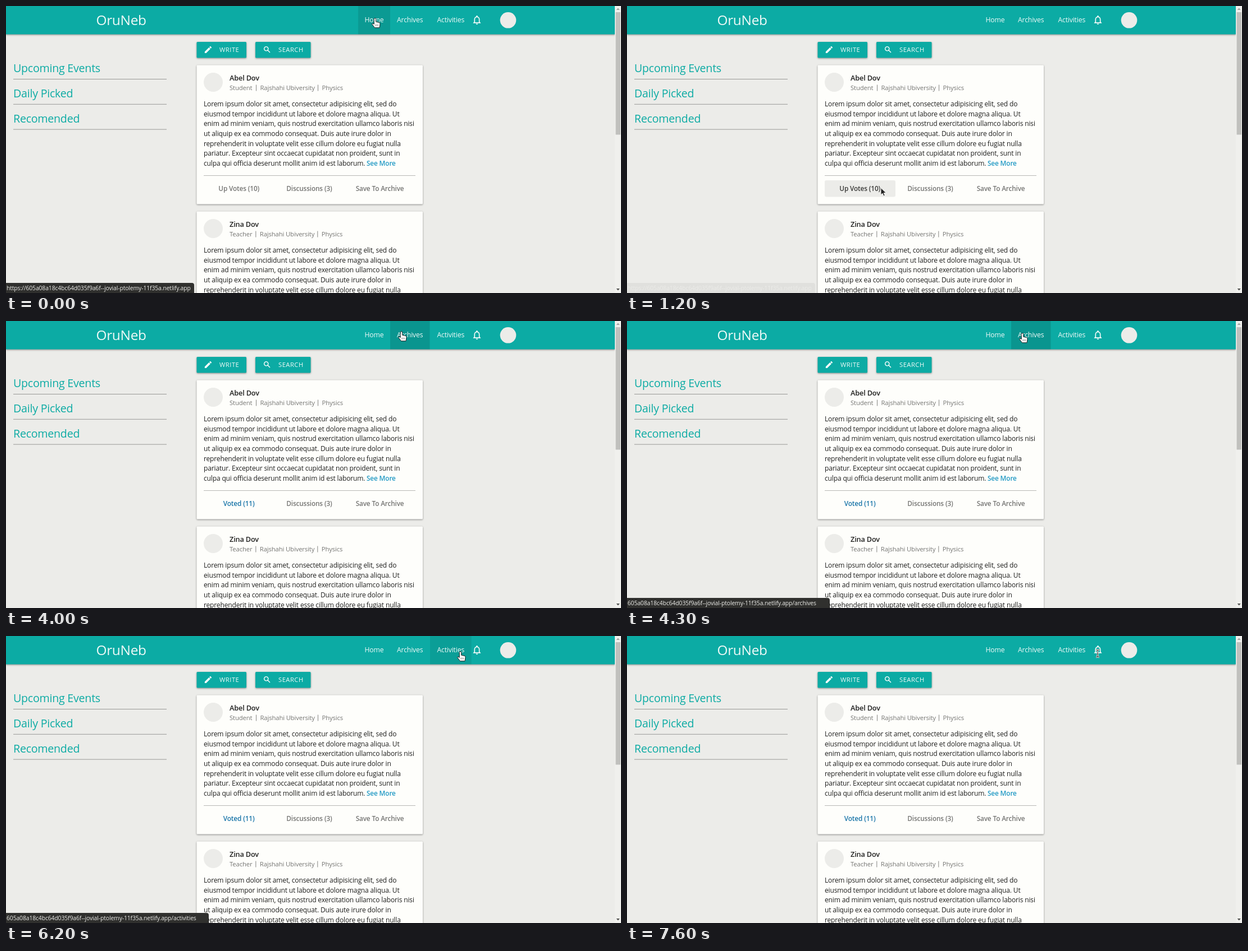
An HTML page for the animation above (8000 ms loop, 1095 px wide and 512 px high).

```html
<!DOCTYPE html>
<html lang="en">
<head>
<meta charset="utf-8">
<title>Study feed</title>
<style>
  html, body { margin: 0; width: 100%; height: 100%; overflow: hidden; background: #ecece9; }
  svg { display: block; width: 1095px; height: 512px; }
  text { font-family: 'Open Sans', 'Noto Sans', sans-serif; letter-spacing: -.012em; white-space: pre; }
  .caps { letter-spacing: .5px; }
  .mid { text-anchor: middle; }
  .semi { font-weight: 600; }
  .raised { filter: drop-shadow(0 1px 1.5px rgba(0, 0, 0, .42)); }
  .blur { filter: blur(15px); }
</style>
</head>
<body>
<svg id="stage" viewBox="0 0 1095 512"></svg>
<script>
const NS = 'http://www.w3.org/2000/svg';
const stage = document.getElementById('stage');
const TEAL = '#0caba4', PALE = '#ecece9', INK = '#1f1f1e', GREY = '#757573';
const LOOP = 8000;

function add(parent, tag, attrs = {}, content) {
  const el = document.createElementNS(NS, tag);
  for (const key in attrs) el.setAttribute(key, attrs[key]);
  if (content !== undefined) el.textContent = content;
  parent.append(el);
  return el;
}
const group = (parent, attrs) => add(parent, 'g', attrs);
const rect = (parent, x, y, width, height, fill, more) =>
  add(parent, 'rect', { x, y, width, height, fill, ...more });
const circle = (parent, cx, cy, r, fill) => add(parent, 'circle', { cx, cy, r, fill });
const rule = (parent, x, y, width, fill) => rect(parent, x, y, width, 1, fill);
const text = (parent, x, y, size, fill, content, cls = '') =>
  add(parent, 'text', { x, y, fill, 'font-size': size, class: cls }, content);
const path = (parent, d, attrs) => add(parent, 'path', { d, ...attrs });

// Sidebar
['Upcoming Events', 'Daily Picked', 'Recomended'].forEach((title, i) => {
  text(stage, 13, 118 + i * 45, 19.6, TEAL, title);
  rule(stage, 13, 130 + i * 44.8, 273, '#999997');
});

// Toolbar buttons
function button(x, width, textX, label) {
  rect(stage, x, 64, width, 28.5, TEAL, { rx: 1.5, class: 'raised' });
  text(stage, textX, 82, 11.2, '#f4fbf9', label, 'caps');
}
button(339.5, 88.5, 380, 'WRITE');
button(444, 98.5, 485, 'SEARCH');
path(stage, 'M3 17.25V21h3.75L17.8 9.94l-3.75-3.75zM20.7 7.04a1 1 0 0 0 0-1.41l-2.34-2.34a1 1 0 0 0-1.41 0l-1.83 1.83 3.75 3.75z',
  { fill: '#fff', transform: 'translate(351.8 69.8) scale(.68)' });
path(stage, 'M15 9.5a5.5 5.5 0 1 1-11 0a5.5 5.5 0 1 1 11 0M13.7 13.7l6 6',
  { fill: 'none', stroke: '#fff', 'stroke-width': 2.1, transform: 'translate(457 70) scale(.66)' });

// Posts
const LOREM = [
  'Lorem ipsum dolor sit amet, consectetur adipisicing elit, sed do',
  'eiusmod tempor incididunt ut labore et dolore magna aliqua. Ut',
  'enim ad minim veniam, quis nostrud exercitation ullamco laboris nisi',
  'ut aliquip ex ea commodo consequat. Duis aute irure dolor in',
  'reprehenderit in voluptate velit esse cillum dolore eu fugiat nulla',
  'pariatur. Excepteur sint occaecat cupidatat non proident, sunt in',
  'culpa qui officia deserunt mollit anim id est laborum.'
];

function post(top, name, role, shift) {
  const g = group(stage, { transform: `translate(0 ${top})` });
  rect(g, 339.5, 0, 402.5, 248, '#fefefb', { rx: 1.5, class: 'raised' });
  circle(g, 369, 30.5, 17, PALE);
  text(g, 398, 27.5, 12.7, INK, name, 'semi');
  text(g, 398, 44.7, 11.3, GREY, role);
  text(g, 452.5 - shift, 44.7, 11.3, GREY, 'Rajshahi Ubiversity');
  text(g, 562.5 - shift, 44.7, 11.3, GREY, 'Physics');
  for (const x of [445, 555]) rect(g, x - shift, 35, 1, 11, '#858583');
  LOREM.forEach((line, i) => text(g, 352, 73.3 + i * 17.7, 12, INK, line));
  text(g, 642, 179.5, 11.8, '#2099c4', 'See More', 'semi');
  rule(g, 352, 196.5, 377, '#b9b9b6');
  const pad = rect(g, 352, 205.5, 126, 29.5, PALE, { rx: 3, opacity: 0 });
  const vote = text(g, 414.7, 224.7, 11.8, GREY, 'Up Votes (10)', 'semi mid');
  text(g, 540, 224.7, 11.8, GREY, 'Discussions (3)', 'semi mid');
  text(g, 665.6, 224.7, 11.8, GREY, 'Save To Archive', 'semi mid');
  return { pad, vote };
}
const first = post(105.5, 'Abel Dov', 'Student', 0);
post(366.5, 'Zina Dov', 'Teacher', .7);

// Header
rect(stage, 0, -5, 1084, 55.5, TEAL, { class: 'raised' });
const tabs = {};
for (const [key, x, width, label] of [
  ['home', 627, 57, 'Home'], ['archives', 684, 70.5, 'Archives'], ['activities', 755, 73.5, 'Activities']
]) {
  tabs[key] = rect(stage, x, 0, width, 50.5, '#000', { opacity: 0 });
  text(stage, x + width / 2, 29, 12.2, '#f0faf8', label, 'mid');
}
text(stage, 160.5, 33.5, 24.4, '#f0faf8', 'OruNeb');
path(stage, 'M12 22c1.1 0 2-.9 2-2h-4c0 1.1.9 2 2 2zm6-6v-5c0-3.07-1.63-5.64-4.5-6.32V4c0-.83-.67-1.5-1.5-1.5s-1.5.67-1.5 1.5v.68C7.64 5.36 6 7.92 6 11v5l-2 2v1h16v-1zm-2 1H8v-6c0-2.48 1.51-4.5 4-4.5s4 2.02 4 4.5z',
  { fill: '#f0faf8', transform: 'translate(828.4 14.8) scale(.84)' });
circle(stage, 894, 25.3, 14.3, PALE);

// Notification panel
const panel = group(stage, { opacity: 0 });
rect(panel, 586, 54, 330, 172, '#000', { opacity: .34, class: 'blur' });
rect(panel, 590, 51, 321.5, 165.5, PALE, { class: 'raised' });
text(panel, 602, 81, 20.2, TEAL, 'Notification');
[['Someone', ' did that , Someone did this..'],
 ['Hadir Keleb', ' wrote about politics.'],
 ['Zina Dov', ' became an professor.']].forEach(([who, what], i) => {
  const y = i * 38;
  rule(panel, 602, 93 + y, 298, '#cbcbc8');
  const line = text(panel, 602, 110 + y, 11, INK, '');
  add(line, 'tspan', { class: 'semi' }, who);
  add(line, 'tspan', {}, what);
  text(panel, 602, 125.3 + y, 9.5, GREY, '8:30PM, Today');
});

// Scrollbar
rect(stage, 1084, 0, 11, 512, '#f0f0ed');
rect(stage, 1085.5, 11, 8.5, 218.5, '#c0c0bd');
path(stage, 'M1086.7 7l3-3.4 3 3.4z', { fill: '#a2a2a0' });
path(stage, 'M1086.7 504l3 3.4 3-3.4z', { fill: '#50504e' });

// Link address bubble
const bubble = group(stage, { opacity: 0 });
const bubbleBox = rect(bubble, -5, 494, 0, 24, '#30302e', { rx: 4 });
const bubbleText = text(bubble, 1, 506.6, 10.4, '#ededea', '');
const HOST = '605a08a18c4bc64d035f9a6f--jovial-ptolemy-11f35a.netlify.app';
const LINKS = {
  home: ['https://' + HOST, 335],
  archives: [HOST + '/archives', 361],
  activities: [HOST + '/activities', 361]
};

// Pointers, each drawn around its hot spot
const pointers = { hand: group(stage), arrow: group(stage), beam: group(stage) };
path(pointers.hand, 'M-1.7 1.4a1.7 1.7 0 0 1 3.4 0V6.2l5.6 1.2q1.9.5 1.7 2.5l-.9 6.8H-.4l-4.6-5.9q-.7-1.5.9-1.8l2.4 1.4z',
  { fill: '#fff', stroke: '#222', 'stroke-width': 1 });
path(pointers.hand, 'M3.2 13.8v-3.2M5.4 13.8v-3.2M1 13.8v-3.2', { stroke: '#555', 'stroke-width': .7 });
path(pointers.arrow, 'M0 .5V13l3-2.8 2 4.8 2.2-.9-2-4.6h4z',
  { fill: '#222', stroke: '#f8f8f5', 'stroke-width': .9 });
for (const [stroke, width] of [['#f4f4f1', 3], ['#444', 1.1]])
  path(pointers.beam, 'M-3-6.5q3 0 3 2v9q0 2-3 2M3-6.5q-3 0-3 2v9q0 2 3 2M-1.5 1h3',
    { fill: 'none', stroke, 'stroke-width': width });

// Steps: [time, values...], each held until the next
const MOVES = [
  [0, 657, 22, 'hand'], [800, 654, 34, 'hand'], [900, 628, 98, 'arrow'], [1000, 558, 206, 'beam'],
  [1100, 482, 296, 'arrow'], [1200, 452, 324, 'arrow'], [1400, 447, 324, 'arrow'],
  [1600, 444, 325, 'arrow'], [1700, 442, 327, 'arrow'], [2100, 442, 328, 'arrow'],
  [3400, 470, 288, 'arrow'], [3500, 570, 195, 'beam'], [3600, 700, 100, 'arrow'],
  [3700, 785, 42, 'hand'], [3800, 748, 28, 'hand'], [3900, 722, 21, 'hand'],
  [4000, 704, 19, 'hand'], [4100, 702, 20, 'hand'], [4200, 703, 21, 'hand'], [4300, 704, 22, 'hand'],
  [4700, 690, 23, 'hand'], [4800, 672, 22, 'hand'], [4900, 659, 20, 'hand'], [5000, 653, 20, 'hand'],
  [5600, 692, 20, 'hand'], [5700, 772, 22, 'hand'], [5800, 849, 25, 'arrow'],
  [6000, 838, 27, 'beam'], [6100, 822, 29, 'hand'], [6200, 809, 28, 'hand'],
  [6300, 815, 30, 'hand'], [6400, 828, 32, 'hand'], [6500, 838, 31, 'beam']
];
const SHADES = {
  home: [[0, .1], [800, .1], [900, .06], [1000, .02], [1100, 0], [4800, .06], [4900, .09], [5000, .1],
    [5600, .06], [5700, .02], [5800, 0]],
  archives: [[0, 0], [3800, .07], [3900, .11], [4000, .13], [4800, .08], [4900, .04], [5000, 0],
    [5600, .06], [5700, .03], [5800, 0]],
  activities: [[0, 0], [3700, .06], [3800, .04], [3900, .02], [4000, 0], [5700, .06], [5800, .03],
    [6000, 0], [6100, .05], [6200, .08], [6300, .1], [6500, .06], [6600, .02], [6700, 0]]
};
const BUBBLE = [
  [0, 'home', 1], [1100, 'home', .5], [1200, 'home', .06], [3400, 'home', 0],
  [4100, 'archives', .5], [4200, 'archives', 1], [4800, 'home', 1], [5600, 'archives', 1],
  [5700, 'activities', 1], [6600, 'activities', .7], [6700, 'activities', .2], [6800, 'activities', 0]
];
const PANEL = [[0, 0], [6700, .55], [6800, 1], [7600, 0]];
const VOTE = [
  [0, 'Up Votes (10)', GREY, 0], [1200, 'Up Votes (10)', '#3a3a38', 1],
  [2500, 'Voted (11)', '#1774a8', 1], [3400, 'Voted (11)', '#1774a8', 0]
];

const at = (steps, t) => steps.findLast(step => step[0] <= t).slice(1);

function draw(now) {
  const t = Math.max(0, now) % LOOP;

  const [x, y, kind] = at(MOVES, t);
  for (const key in pointers) {
    pointers[key].setAttribute('visibility', key === kind ? 'visible' : 'hidden');
    pointers[key].setAttribute('transform', `translate(${x} ${y})`);
  }

  for (const key in tabs) tabs[key].setAttribute('opacity', at(SHADES[key], t)[0]);
  panel.setAttribute('opacity', at(PANEL, t)[0]);

  const [link, shown] = at(BUBBLE, t);
  const [address, width] = LINKS[link];
  bubble.setAttribute('opacity', shown);
  bubbleBox.setAttribute('width', width + 5);
  bubbleText.textContent = address;

  const [label, colour, hover] = at(VOTE, t);
  first.vote.textContent = label;
  first.vote.setAttribute('fill', colour);
  first.pad.setAttribute('opacity', hover);

  requestAnimationFrame(draw);
}
draw(performance.now());
</script>
</body>
</html>
```
